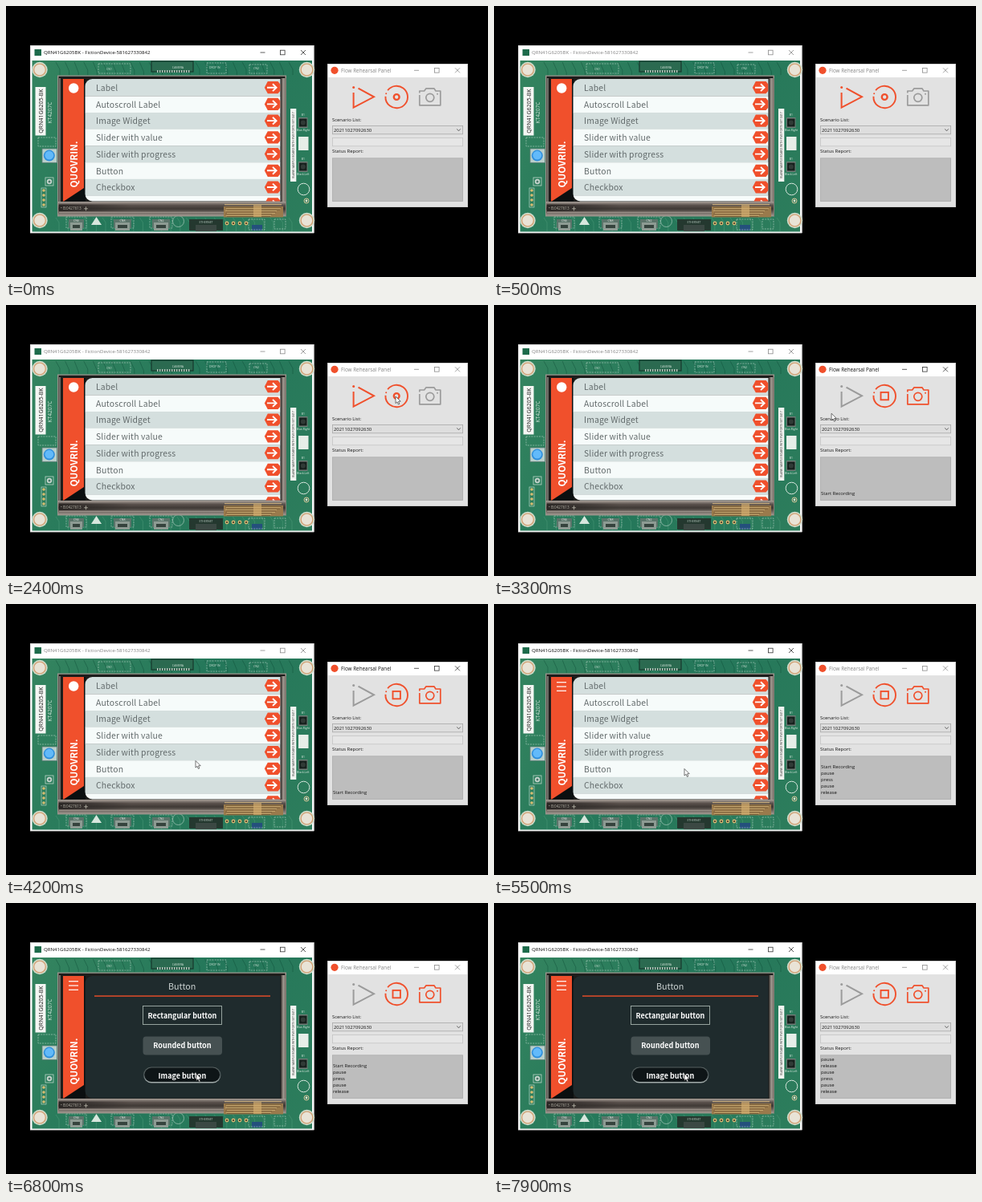
An HTML page with a canvas for the animation above (8000 ms loop, 600 px wide and 338 px high).

```html
<!DOCTYPE html>
<html lang="en">
<head>
<meta charset="utf-8">
<title>Widget recording demo</title>
<style>
html, body { margin: 0; width: 100%; height: 100%; overflow: hidden; background: #000; }
canvas { display: block; width: 600px; height: 338px; }
</style>
</head>
<body>
<canvas id="stage"></canvas>
<script>
const LOOP = 8000;
const ORANGE = '#f0502c', GRAY = '#9b9b9b';
const UI = '"Open Sans", "Noto Sans", sans-serif';
const THIN = '"Noto Sans CJK JP", "Noto Sans CJK SC", "Noto Sans CJK", "Noto Sans", sans-serif';
const ROWS = ['Label', 'Autoscroll Label', 'Image Widget', 'Slider with value',
  'Slider with progress', 'Button', 'Checkbox'];
const LOG = [[2900, 'Start Recording'], [5000, 'pause'], [5000, 'press'], [5350, 'pause'],
  [5350, 'release'], [6850, 'pause'], [6850, 'press'], [7150, 'pause'], [7150, 'release']];
// time, x, y of the pointer
const PATH = [[1150, 557, 243], [1900, 557, 243], [2350, 485, 114], [3000, 485, 114],
  [3900, 236, 195.5], [4500, 236, 195.5], [4900, 237, 205.5], [5900, 237, 205.5],
  [6500, 237, 213], [8000, 237, 213]];

const canvas = document.getElementById('stage');
const c = canvas.getContext('2d');
const dpr = window.devicePixelRatio || 1;
canvas.width = 600 * dpr;
canvas.height = 338 * dpr;

function box(x, y, w, h, fill) {
  c.fillStyle = fill;
  c.fillRect(x, y, w, h);
}
function frame(x, y, w, h, color, lw = 1) {
  c.strokeStyle = color;
  c.lineWidth = lw;
  c.strokeRect(x, y, w, h);
}
function pill(x, y, w, h, r, fill) {
  c.beginPath();
  c.roundRect(x, y, w, h, r);
  c.fillStyle = fill;
  c.fill();
}
function disc(x, y, r, fill) {
  c.fillStyle = fill;
  c.beginPath();
  c.arc(x, y, r, 0, 7);
  c.fill();
}
function ring(x, y, r, color, lw, from = 0, to = 7) {
  c.strokeStyle = color;
  c.lineWidth = lw;
  c.beginPath();
  c.arc(x, y, r, from, to);
  c.stroke();
}
function line(color, lw, ...p) {
  c.strokeStyle = color;
  c.lineWidth = lw;
  c.beginPath();
  for (let i = 0; i < p.length; i += 2) c.lineTo(p[i], p[i + 1]);
  c.stroke();
}
function poly(fill, ...p) {
  c.fillStyle = fill;
  c.beginPath();
  for (let i = 0; i < p.length; i += 2) c.lineTo(p[i], p[i + 1]);
  c.closePath();
  c.fill();
}
function text(s, x, y, font, fill, align = 'left') {
  c.font = font;
  c.fillStyle = fill;
  c.textAlign = align;
  c.fillText(s, x, y);
}
function upText(s, x, y, font, fill) {
  c.save();
  c.translate(x, y);
  c.rotate(-Math.PI / 2);
  text(s, 0, 0, font, fill, 'center');
  c.restore();
}
function fade(x0, y0, x1, y1, ...colors) {
  const g = c.createLinearGradient(x0, y0, x1, y1);
  colors.forEach((color, i) => g.addColorStop(i / (colors.length - 1), color));
  return g;
}
function dashed(x, y, w, h) {
  c.setLineDash([2, 1.2]);
  frame(x, y, w, h, 'rgba(225,240,230,.65)', .7);
  c.setLineDash([]);
}

function titleBar(x, y, title, size, active, [a, b, d]) {
  text(title, x, y + 2.3, size + 'px ' + UI, active ? '#111' : '#858585');
  const ink = active ? '#333' : '#8a8a8a';
  line(ink, .8, a, y, a + 6, y);
  frame(b, y - 2.8, 5.6, 5.6, ink, .8);
  line(ink, .8, d, y - 3, d + 6, y + 3);
  line(ink, .8, d, y + 3, d + 6, y - 3);
}

function board() {
  box(32.5, 68, 348.5, 213.5, fade(32, 68, 381, 281, '#34845f', '#24775a', '#2d7d5c'));
  for (let i = 0; i < 26; i++) {
    const x = 62 + i * 11.6, y = 71 + (i * 7 % 5);
    line('rgba(10,70,50,.4)', 1, x, 70, x + 5, y + 8, x + 5, 86);
    line('rgba(120,190,155,.3)', .8, x, 264, x + 4, 270, x + 4, 281);
  }

  for (const x of [42, 374.5]) for (const y of [79.5, 267.5]) {
    disc(x, y, 9.7, '#cfdccb');
    disc(x, y, 7.8, '#e9e3d6');
    ring(x, y, 7.4, '#d3a276', 1.4);
  }

  // parts along the top edge
  dashed(115, 72, 40, 12);
  dashed(250, 71, 24, 13);
  dashed(303, 73, 22, 11);
  box(181, 69, 52, 13, '#2b6a50');
  frame(181, 69, 52, 13, '#16382c', 1.2);
  for (let x = 188; x < 230; x += 3) box(x, 80, 1.4, 3, '#bccac0');
  text('CAMERA', 214, 78, '3.6px ' + UI, '#d5e4da', 'center');
  text('CN1', 125, 80, '3.6px ' + UI, '#d5e4da');
  text('DROP IN', 253, 78, '3.4px ' + UI, '#d5e4da');
  text('CN2', 308, 79, '3.6px ' + UI, '#d5e4da');

  // left side
  box(36.5, 101, 13, 60.5, '#f4f6f3');
  upText('QRN41G6205-BK', 45.6, 131, '500 7px ' + UI, '#1b1b1b');
  upText('KT4207C', 57, 133, '6.6px ' + UI, '#d4e5da');
  dashed(40, 164, 22, 11);
  box(45, 178, 18.5, 17.5, '#b9cfcb');
  frame(45, 178, 18.5, 17.5, '#5e7e75', .8);
  disc(53.8, 186.6, 7, '#2f8fdc');
  disc(53.8, 186.2, 5.4, '#62bafa');
  frame(49, 214, 10, 10, '#cfe0d5', .7);
  disc(54, 219, 3.2, '#c8d7cf');
  disc(54, 219, 1.5, '#4b786a');
  frame(44, 227, 6, 24, '#cfe0d5', .6);
  for (let y = 230; y < 250; y += 6) disc(47, y, 1.8, '#d9bd72');

  // right side
  box(354, 128, 7.3, 91, '#f2f4f1');
  upText('BLANK SAMPLE BOARD WITH FIVE PORTS SET 0417', 358.8, 173.5, '3.5px ' + UI, '#333');
  for (const [y, s] of [[146, 'Blue-Right'], [201, 'Black-Left']]) {
    box(364, y - 7, 11.5, 13, '#6f7d77');
    box(365, y - 5.5, 9.5, 10, '#17201d');
    disc(369.8, y - .5, 3, '#303a36');
    text(s, 369.8, y + 10, '3.4px ' + UI, '#e3efe7', 'center');
    text('B' + (y % 5), 369.8, y - 9, '3.4px ' + UI, '#e3efe7', 'center');
  }
  box(364, 163, 12.5, 17, '#e6eee8');
  ring(370.5, 228.5, 7.3, '#d7e6dd', 1);
  ring(374, 243, 3, '#d7c69a', 1);
  disc(374, 243, 1.4, '#e9e4d0');

  // parts along the bottom edge
  for (const [x, w] of [[78, 19], [134, 22], [182, 22]]) {
    dashed(x - 3, 263, w + 6, 14);
    box(x, 266, w, 11, '#5b746a');
    box(x + 2, 270, w - 4, 10, '#8d9b93');
    box(x + 5, 273, w - 10, 4, '#35433d');
    text('CN' + x % 9, x + w / 2, 269, '3.6px ' + UI, '#e8f0ea', 'center');
  }
  poly('#d7e6dd', 106, 273, 112.5, 263, 119, 273);
  ring(214.5, 268.5, 7, 'rgba(205,225,214,.6)', .9);
  box(228, 266, 42, 14, '#24382f');
  box(236, 273, 26, 8, '#3b4843');
  text('ETHERNET', 249, 271, '3.5px ' + UI, '#b9cac0', 'center');
  for (let x = 275; x < 300; x += 8) {
    disc(x, 271, 2.4, '#d8b774');
    disc(x, 271, 1.1, '#3a3424');
  }
  box(306, 273, 13, 7, '#24507c');
  dashed(302, 266, 20, 13);
  dashed(334, 266, 14, 12);
}

function bezel() {
  box(64, 86.5, 285, 176, '#99958c');
  box(65.5, 87.8, 282, 173, '#1d1d1b');
  box(66, 90, 2, 155, '#6f6f68');
  box(342.5, 90, 6, 172, fade(342, 0, 349, 0, '#45413c', '#a09890', '#655e57'));
  box(65, 244, 283, 18, fade(0, 244, 0, 262, '#a89f98', '#5b524d', '#3f3935', '#6e6660', '#a39a92'));
  box(66, 247.5, 90, 8.5, fade(66, 0, 156, 0, '#2b2725', 'rgba(43,39,37,0)'));
  line('#b9b0a8', .7, 66, 257.3, 271, 257.3);
  text('\u2022 B:0427613', 68, 254.4, '4.6px ' + UI, '#b5b3a8');
  line('#c9c6b8', .7, 97, 252.8, 102, 252.8);
  line('#c9c6b8', .7, 99.5, 250.3, 99.5, 255.3);
  box(271, 250, 74, 13.5, '#9a7a4c');
  for (let i = 0; i < 9; i++)
    box(273 + i % 3, 251 + i * 1.4, 70 - i * 2, .7, i % 2 ? '#dcbd80' : '#6b5232');
  box(308, 247, 10, 16, 'rgba(214,176,112,.65)');
  box(272, 247, 71, 1.3, '#bca377');
}

function sidebar(menu) {
  box(71, 91, 28, 152.5, '#0b0f10');
  poly(ORANGE, 71, 91, 97, 91, 97, 227, 72, 243.5, 71, 243.5);
  if (menu) for (const y of [97.7, 103, 108.3]) line('#fff', 1.2, 78, y, 90, y);
  else disc(84.2, 102.5, 6.2, '#fff');
  upText('QUOVRIN.', 88.8, 197.5, 'bold 11.7px ' + THIN, '#fff');
}

function list() {
  c.letterSpacing = '.15px';
  for (let i = 0; i < 8; i++) {
    const y = 91.5 + i * 20.72, m = y + 10.2;
    box(98, i ? y : 91, 244, 21, i % 2 ? '#f6fbfa' : '#d4dfde');
    if (ROWS[i]) text(ROWS[i], 112, m + 4.3, '300 10.4px ' + THIN, '#636b6c');
    poly(ORANGE, 321.8, m, 325.8, m - 7.6, 338.5, m - 7.6, 341.5, m - 4, 341.5, m + 4,
      338.5, m + 7.6, 325.8, m + 7.6);
    line('#fff', 1.9, 325, m, 336, m);
    line('#fff', 1.9, 332, m - 4.4, 336.6, m, 332, m + 4.4);
  }
  c.letterSpacing = '0px';
}

function buttonPage(dx) {
  c.save();
  c.translate(dx, 0);
  box(98, 91, 244, 153, '#1f2b2d');
  text('Button', 219.2, 107.9, '300 10.8px ' + THIN, '#ccd3d2', 'center');
  box(110, 115.3, 219, 1.5, '#e04c2a');
  frame(170.5, 128.5, 98, 23, '#a3b0aa', .9);
  pill(170.5, 166.5, 98.5, 23, 4, '#465152');
  pill(171, 204.6, 96.5, 19.8, 9.9, fade(0, 205, 0, 224, '#56605f', '#4b5658', '#a5aead'));
  pill(172.4, 205.6, 93.7, 17.4, 8.7, '#0e1517');
  ['Rectangular button', 'Rounded button', 'Image button'].forEach((s, i) =>
    text(s, 219.4, 144 + i * 37.4, 'bold 9px ' + THIN, '#fff', 'center'));
  c.restore();
}

function device(t) {
  box(30, 49, 353.5, 234, '#fff');
  frame(30.5, 49.5, 352.5, 233.5, '#d4d4d4', .8);
  box(35.5, 54, 8.5, 8, '#1d6b4b');
  titleBar(47, 58, 'QRN41G6205BK - FictionDevice-581627330842', 6.1,
    t < 500 || t >= 4900, [316.5, 341.5, 367]);
  board();
  bezel();
  sidebar(t >= 5400);
  c.save();
  c.beginPath();
  c.roundRect(98.5, 91, 243, 152.5, [9, 0, 0, 9]);
  c.clip();
  const p = Math.min(1, Math.max(0, (t - 5520) / 220));
  if (p < 1) list();
  if (p > 0) buttonPage(244 * (1 - p) ** 3);
  c.restore();
}

function playIcon(color) {
  line(color, 2, 438.5, 102.6, 458, 113.3, 432.6, 126.6, 432.6, 108);
  disc(432.7, 101.6, 1.5, color);
}
function recordIcon(on) {
  ring(486.2, 113.5, 13.8, ORANGE, 1.9, -2.5, 3.2);
  disc(473.2, 109.2, 1, ORANGE);
  if (on) frame(481.5, 108.9, 9.4, 9.4, ORANGE, 1.9);
  else ring(486.2, 113.5, 3.4, ORANGE, 2.4);
}
function cameraIcon(color) {
  c.lineJoin = 'round';
  line(color, 1.7, 514.8, 111, 514.8, 123.8, 540.8, 123.8, 540.8, 106, 535, 106,
    532.8, 102.8, 523, 102.8, 520.6, 106, 514.8, 106, 514.8, 108.5);
  c.lineJoin = 'miter';
  ring(527.8, 114.3, 5, color, 1.7);
  disc(537, 109.8, 1, color);
}

function tool(t) {
  const rec = t >= 2800;
  const small = '5.9px ' + UI;
  const ink = '#161616';
  box(400, 72, 175, 179, '#e2e2e2');
  box(400, 72, 175, 17, '#fff');
  frame(400.4, 72.4, 174.2, 178.2, '#c8c8c8', .8);
  disc(409, 80.3, 4.6, ORANGE);
  titleBar(417, 80.3, 'Flow Rehearsal Panel', 6.35, t >= 2650 && t < 4900, [508, 533.5, 559]);
  playIcon(rec ? GRAY : ORANGE);
  recordIcon(rec);
  cameraIcon(rec ? ORANGE : GRAY);

  text('Scenario List:', 406, 143.8, small, ink);
  box(406, 149, 163, 11, '#dedede');
  frame(406.4, 149.4, 162.2, 10.4, '#a9a9a9', .8);
  text('20211027092630', 408, 156.8, small, ink);
  line('#555', .9, 561.3, 153.4, 563.5, 155.8, 565.7, 153.4);
  box(406, 164, 163, 11, '#e6e6e6');
  frame(406.4, 164.4, 162.2, 10.4, '#c4c4c4', .8);
  text('Status Report:', 406, 183.3, small, ink);
  box(406, 189.5, 163, 54.5, '#bdbdbd');
  frame(406.4, 189.9, 162.2, 53.7, '#adadad', .7);
  const lines = LOG.filter(l => l[0] <= t).slice(-6);
  lines.forEach((l, i) =>
    text(l[1], 407, 236.7 - (lines.length - 1 - i) * 7.85, small, ink));
}

function pointer(t) {
  if (t < PATH[0][0]) return;
  const i = PATH.findIndex(k => k[0] > t);
  const [t0, x0, y0] = PATH[i - 1], [t1, x1, y1] = PATH[i];
  const u = (t - t0) / (t1 - t0), e = u * u * (3 - 2 * u);
  c.save();
  c.translate(x0 + (x1 - x0) * e, y0 + (y1 - y0) * e);
  poly('#fff', 0, 0, 0, 8.6, 2, 6.8, 3.4, 10, 4.8, 9.4, 3.5, 6.3, 6.2, 6.2);
  c.strokeStyle = '#3a3a3a';
  c.lineWidth = .7;
  c.stroke();
  c.restore();
}

const start = performance.now();
function draw(now) {
  const t = Math.max(0, now - start) % LOOP;
  c.setTransform(dpr, 0, 0, dpr, 0, 0);
  box(0, 0, 600, 338, '#000');
  device(t);
  tool(t);
  pointer(t);
  requestAnimationFrame(draw);
}
draw(start);
</script>
</body>
</html>
```
